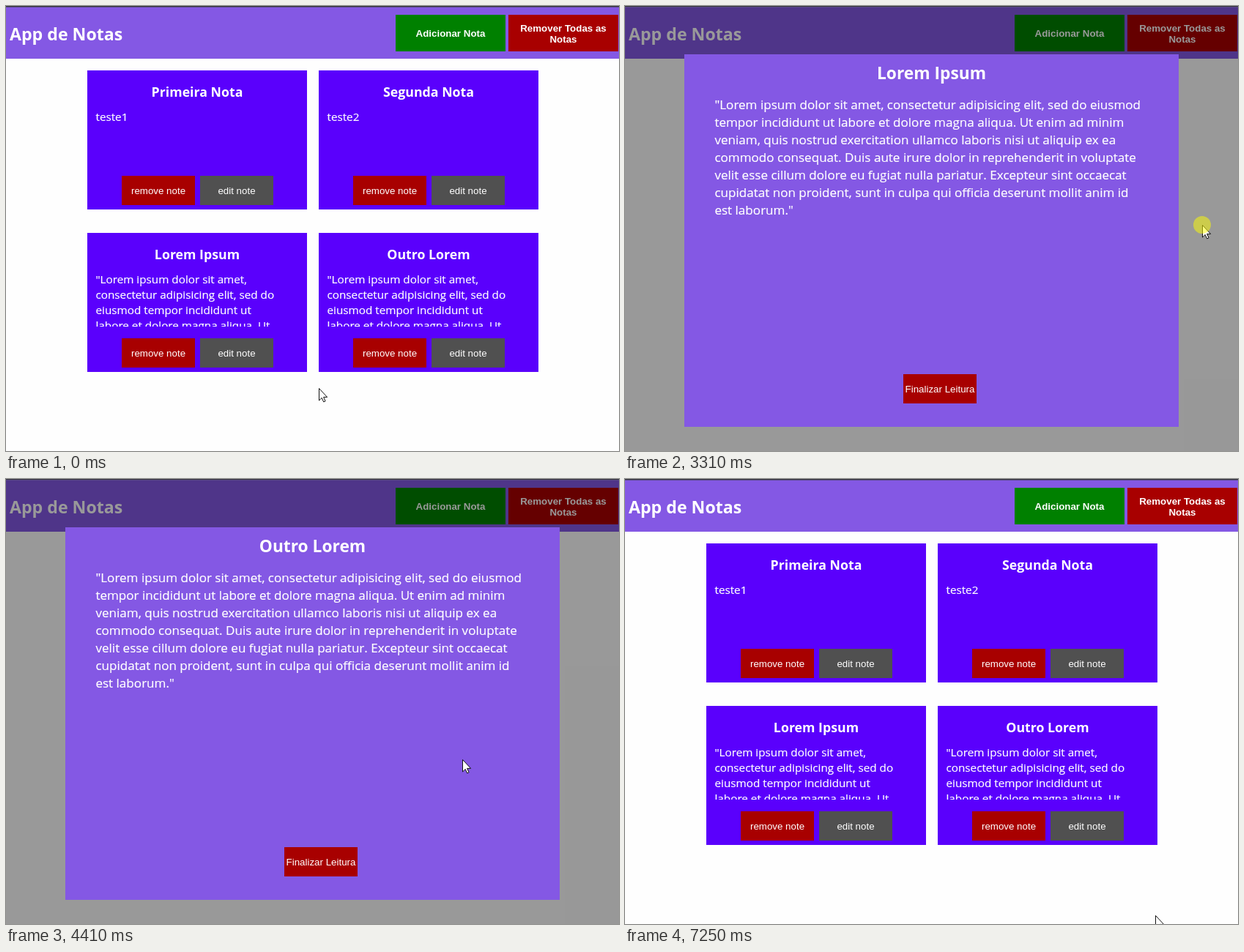
An HTML page that plays this animation: 837 px wide and 608 px high, repeating every 7.32 s.

```html
<!DOCTYPE html>
<html lang="pt">
<head>
<meta charset="utf-8">
<title>App de Notas</title>
<style>
html, body { margin: 0; width: 100%; height: 100%; overflow: hidden; background: #fefefe; }
svg { display: block; width: 837px; height: 608px; }
text { fill: #fff; font-family: "Open Sans", "Noto Sans", sans-serif; white-space: pre; }
.brand { font-size: 23.15px; font-weight: 700; }
.title { font-size: 17.75px; font-weight: 700; text-anchor: middle; }
.head { font-size: 22.75px; font-weight: 700; text-anchor: middle; }
.body { font-size: 15.25px; }
.read { font-size: 17.07px; }
.body, .read { stroke: #fff; stroke-width: .2px; }
.btn { font: 13.333px "Liberation Sans", Arial, sans-serif; text-anchor: middle; }
.bold { font-weight: 700; }
.cur { fill: #fff; stroke: #111; stroke-linejoin: round; }
</style>
</head>
<body>
<svg id="stage" viewBox="0 0 837 608"></svg>
<script>
const LOOP = 7320, STEP = 69, PRESS = 70;
const PURPLE = '#8458e4', BLUE = '#5a00fc', RED = '#a80000', GREEN = '#008000', GRAY = '#505050';
const CARD = { w: 300, h: 190, x: 111, y: 88, dx: 316, dy: 222, buttons: 144 };

const rect = (x, y, w, h, fill) =>
  `<rect x="${x}" y="${y}" width="${w}" height="${h}" fill="${fill}"/>`;
const text = (cls, x, y, str) => `<text class="${cls}" x="${x}" y="${y}">${str}</text>`;
const lines = (cls, x, y, gap, list) =>
  list.map((str, i) => text(cls, x, y + i * gap, str)).join('');
const button = (x, y, fill, label) =>
  rect(x, y, 100, 40, fill) + text('btn', x + 50, y + 25, label);
const bigButton = (x, fill, ...label) =>
  rect(x, 12, 150, 50, fill) + lines('btn bold', x + 75, 49.5 - 7.5 * label.length, 15, label);

const excerpt = [
  '"Lorem ipsum dolor sit amet,',
  'consectetur adipisicing elit, sed do',
  'eiusmod tempor incididunt ut',
  'labore et dolore magna aliqua. Ut'
];
const full = [
  '"Lorem ipsum dolor sit amet, consectetur adipisicing elit, sed do eiusmod',
  'tempor incididunt ut labore et dolore magna aliqua. Ut enim ad minim',
  'veniam, quis nostrud exercitation ullamco laboris nisi ut aliquip ex ea',
  'commodo consequat. Duis aute irure dolor in reprehenderit in voluptate',
  'velit esse cillum dolore eu fugiat nulla pariatur. Excepteur sint occaecat',
  'cupidatat non proident, sunt in culpa qui officia deserunt mollit anim id',
  'est laborum."'
];
const notes = [
  ['Primeira Nota', ['teste1']],
  ['Segunda Nota', ['teste2']],
  ['Lorem Ipsum', excerpt],
  ['Outro Lorem', excerpt]
];

const card = ([title, body], i) =>
  `<g transform="translate(${CARD.x + i % 2 * CARD.dx} ${CARD.y + (i >> 1) * CARD.dy})">` +
  rect(0, 0, CARD.w, CARD.h, BLUE) +
  text('title', CARD.w / 2, 36, title) +
  `<g clip-path="url(#fold)">${lines('body', 11.5, 69, 21, body)}</g>` +
  button(47, CARD.buttons, RED, 'remove note') +
  button(154, CARD.buttons, GRAY, 'edit note') +
  '</g>';

document.getElementById('stage').innerHTML =
  '<clipPath id="fold"><path d="M0 0H300V128H0Z"/></clipPath>' +
  rect(0, 0, 837, 608, '#fefefe') +
  rect(0, 0, 837, 72, PURPLE) +
  text('brand', 5, 47, 'App de Notas') +
  bigButton(532, GREEN, 'Adicionar Nota') +
  bigButton(686, RED, 'Remover Todas as', 'Notas') +
  notes.map(card).join('') +
  '<g id="modal">' +
  rect(0, 0, 837, 608, 'rgba(0,0,0,.4)') +
  rect(81, 66, 675, 509, PURPLE) +
  '<text class="head" id="head" x="418.5" y="100"></text>' +
  lines('read', 122.4, 141, 24, full) +
  button(380, 503, RED, 'Finalizar Leitura') +
  '</g>' +
  rect(0, 0, 837, 1, '#35353b') + rect(0, 1, 837, 1, '#5b4b86') +
  '<g id="pointer">' +
  '<path class="cur" id="arrow" d="M.5 .5V17L4.2 13.4L6.7 18.9L9.1 17.9L6.6 12.4H11.6Z"/>' +
  '<path class="cur" id="hand" d="M1 2Q2.2 .4 3.6 2V9Q5 7.8 6.2 9.2Q7.8 8.4 8.8 9.8Q10.8 9.2 11.3 11V16' +
  'Q10.6 19 9 21.5V23.3H1V21.5Q-1 19 -3.8 16Q-5.6 13.5 -4.5 12.5Q-3 11.5 -1 13.5L1 15Z"/>' +
  '<path id="beam" d="M-3 -7.5H3M0 -7.5V7.5M-3 7.5H3" stroke="#111"/>' +
  '<circle id="halo" r="12" fill="#ff0" opacity=".5"/>' +
  '</g>';

// Each move starts where the last one ended and bends towards "via".
const moves = [
  { from: 380, to: 730, end: [316, 394], via: [385, 460] },
  { from: 1080, to: 1080, end: [316, 385] },
  { from: 1140, to: 1830, end: [560, 172], via: [345, 112] },
  { from: 1890, to: 2580, end: [743, 237], via: [640, 180] },
  { from: 2650, to: 3170, end: [788, 299] },
  { from: 3580, to: 4270, end: [623, 383], via: [765, 375] },
  { from: 4800, to: 5490, end: [456, 507], via: [495, 425] },
  { from: 5560, to: 5710, end: [451, 517] },
  { from: 5850, to: 5980, end: [449, 523] },
  { from: 6650, to: 7250, end: [744, 605], via: [590, 535] }
];
let rest = [427, 522];
for (const m of moves) {
  m.start = rest;
  m.via ??= m.end.map((v, i) => (v + rest[i]) / 2);
  m.steps = Math.round((m.to - m.from) / STEP) + 1;
  rest = m.end;
}

// A click changes the modal PRESS ms after its start; an empty title closes it.
const clicks = [
  { at: 870, hold: 2 * PRESS, title: 'Lorem Ipsum' },
  { at: 3310, hold: PRESS, title: '' },
  { at: 4340, hold: PRESS, title: 'Outro Lorem' },
  { at: 6580, hold: PRESS, title: '' }
];

const ease = u => (u + u * u * (3 - 2 * u)) / 2;
const inside = (x, y, l, t, w, h) => x >= l && x < l + w && y >= t && y < t + h;

function place(t) {
  const m = moves.findLast(m => t >= m.from);
  if (!m) return moves[0].start;
  const k = Math.floor((t - m.from) / STEP + 0.1) + 1;
  const p = ease(Math.min(1, k / m.steps)), q = 1 - p;
  return m.end.map((v, i) => Math.round(q * q * m.start[i] + 2 * p * q * m.via[i] + p * p * v));
}

function shape(x, y, open) {
  if (open) return inside(x, y, 122, 123, 583, 168) ? 'beam' : 'arrow';
  const onCard = notes.some((_, i) => inside(x, y,
    CARD.x + i % 2 * CARD.dx, CARD.y + (i >> 1) * CARD.dy, CARD.w, CARD.buttons));
  return onCard ? 'hand' : 'arrow';
}

const el = id => document.getElementById(id);
const [modal, head, pointer, halo] = ['modal', 'head', 'pointer', 'halo'].map(el);
const shapes = ['arrow', 'hand', 'beam'].map(el);
const show = (node, on) => { node.style.display = on ? '' : 'none'; };

function draw(t) {
  const title = clicks.findLast(c => t >= c.at + PRESS)?.title;
  const [x, y] = place(t);
  const kind = shape(x, y, title);
  show(modal, title);
  head.textContent = title || '';
  pointer.setAttribute('transform', `translate(${x} ${y})`);
  shapes.forEach(s => show(s, s.id === kind));
  show(halo, clicks.some(c => t >= c.at && t < c.at + c.hold));
}

const start = performance.now();
function tick() {
  draw((performance.now() - start) % LOOP);
  requestAnimationFrame(tick);
}
tick();
</script>
</body>
</html>
```
